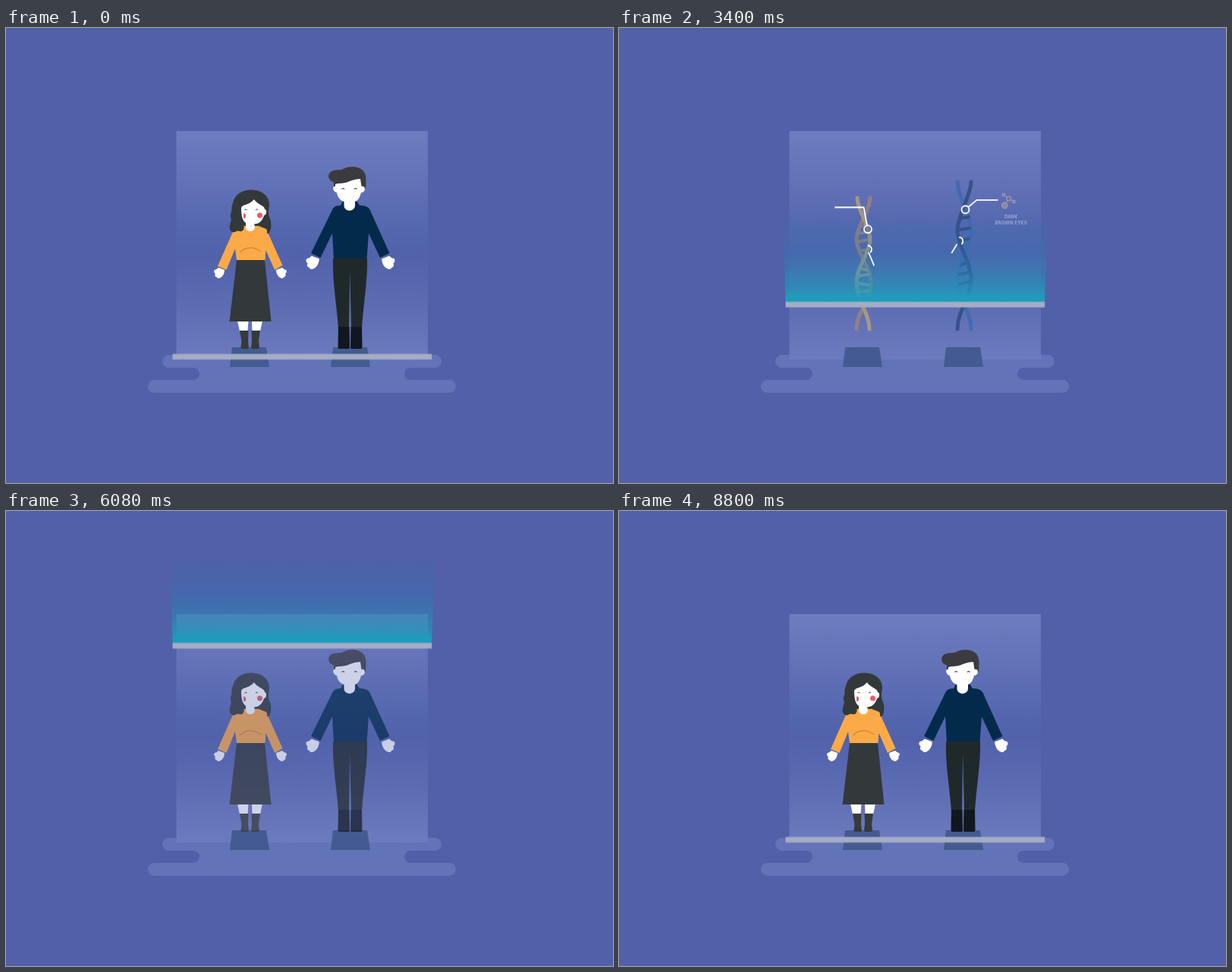
An HTML page that plays this animation: 800 by 600 pixels, repeating every 8.88 s.

```html
<!DOCTYPE html>
<html lang="en">
<head>
<meta charset="utf-8">
<title>Scanner</title>
<style>
html, body { margin: 0; width: 100%; height: 100%; overflow: hidden; background: #5160a9; }
svg { display: block; width: 100vw; height: 100vh; }

/* One pass forward, then the same pass backward. */
.scan, .trail, .people, .dna, .label, .draw path {
  animation: 4440ms linear -20ms infinite alternate both;
}
.scan { animation-name: scan; }
.trail.below { animation-name: below; }
.trail.above { animation-name: above; }
.people { animation-name: leave; }
.dna { animation-name: enter; }
.label { animation-name: label; }

.draw path { fill: none; stroke: #fff; stroke-width: 1.8; stroke-dasharray: 1 2; }
.draw .ring { fill: rgba(82, 98, 170, .45); fill-opacity: 0; }
.first .line { animation-name: line1; }
.first .ring { animation-name: ring1; fill-opacity: 1; }
.second .line { animation-name: line2; }
.second .ring { animation-name: ring2; }
.third .line { animation-name: line3; }
.third .ring { animation-name: ring3; }

@keyframes scan {
  0%, 1.351% { transform: translateY(433.5px); animation-timing-function: cubic-bezier(.333, 0, .667, 1); }
  32.883% { transform: translateY(138.7px); }
  55.405% { transform: translateY(138.7px); animation-timing-function: cubic-bezier(.333, 0, .667, 1); }
  86.937%, 100% { transform: translateY(433.5px); }
}
@keyframes below {
  0%, 1.8% { opacity: 0; }
  8.56%, 37.387% { opacity: 1; }
  48.198%, 100% { opacity: 0; }
}
@keyframes above {
  0%, 55.5% { opacity: 0; }
  62.6%, 80.63% { opacity: 1; }
  91.44%, 100% { opacity: 0; }
}
@keyframes leave { 0%, 58.1% { opacity: 1; } 72.5%, 100% { opacity: 0; } }
@keyframes enter { 0%, 68.9% { opacity: 0; } 79.28%, 100% { opacity: 1; } }
@keyframes label { 0%, 74.1% { opacity: 0; } 79.95%, 100% { opacity: 1; } }
@keyframes line1 { 0%, 71.17% { stroke-dashoffset: 1; } 77.6%, 100% { stroke-dashoffset: 0; } }
@keyframes ring1 { 0%, 71.53% { stroke-dashoffset: 1; fill-opacity: 0; } 75.59%, 100% { stroke-dashoffset: 0; fill-opacity: 1; } }
@keyframes line2 { 0%, 74.77% { stroke-dashoffset: 1; } 81.08%, 100% { stroke-dashoffset: 0; } }
@keyframes ring2 { 0%, 75.45% { stroke-dashoffset: 1; } 79.5%, 100% { stroke-dashoffset: 0; } }
@keyframes line3 { 0%, 78.47% { stroke-dashoffset: 1; } 84.77%, 100% { stroke-dashoffset: 0; } }
@keyframes ring3 { 0%, 79.14% { stroke-dashoffset: 1; } 83.2%, 100% { stroke-dashoffset: 0; } }

.strands { fill: none; stroke-width: 5; stroke-linecap: round; }
.label text {
  font: 700 6px Inter, "Open Sans", sans-serif;
  letter-spacing: .2px; text-anchor: middle; fill: #dfe2f0;
}
</style>
</head>
<body>
<svg viewBox="0 0 800 600">
  <defs>
    <linearGradient id="wall" x2="0" y2="1">
      <stop offset="0" stop-color="#6d7cbe"/>
      <stop offset=".12" stop-color="#6877bb"/>
      <stop offset=".28" stop-color="#5f6fb5"/>
      <stop offset=".42" stop-color="#5467af"/>
      <stop offset=".54" stop-color="#5162ab"/>
      <stop offset=".72" stop-color="#5a6ab1"/>
      <stop offset=".88" stop-color="#6574b8"/>
      <stop offset="1" stop-color="#6c7bbe"/>
    </linearGradient>
    <linearGradient id="teal" x2="0" y2="1">
      <stop offset="0" stop-color="#1f9dbb"/>
      <stop offset=".07" stop-color="#1f9dbb" stop-opacity=".97"/>
      <stop offset=".13" stop-color="#209bbb" stop-opacity=".76"/>
      <stop offset=".36" stop-color="#2190ba" stop-opacity=".45"/>
      <stop offset=".62" stop-color="#2a80b8" stop-opacity=".24"/>
      <stop offset=".9" stop-color="#2a80b8" stop-opacity=".09"/>
      <stop offset="1" stop-color="#2a80b8" stop-opacity="0"/>
    </linearGradient>
    <path id="hand" fill="#fff" d="M-1-6 7-3C7 1 5 6 1 7.5-1 8.5-3 8-3 6.5-6 6-6 3-5 2-8 0-7-4-4-3.5Z"/>
    <path id="block" fill="#435b90" d="M3 421H48L52 447H0Z"/>
    <path id="trail" fill="url(#teal)" d="M219.500 0H561L565 112H216Z"/>
    <path id="ring" d="M0-5A5 5 0 0 1 0 5A5 5 0 0 1 0-5" pathLength="1"/>
  </defs>

  <rect width="800" height="600" fill="#5160a9"/>
  <path fill="#6373b7" d="M214.500 431H565.500a8.500 8.500 0 0 1 0 17H533a8 8 0 0 0 0 16H584.500a8.500 8.500 0 0 1 0 17H195.500a8.500 8.500 0 0 1 0-17H247a8 8 0 0 0 0-16H214.500a8.500 8.500 0 0 1 0-17Z"/>
  <rect x="224.500" y="136" width="331.500" height="301" fill="url(#wall)"/>
  <use href="#block" x="295"/>
  <use href="#block" x="428"/>

  <g class="people">
    <g id="woman">
      <path fill="#33393a" d="M323 213.500C338 213.500 347 222 347 233 346 242 345 246 348 252 350 257 350 266 346 271L341 272 312 267C308 270 304 266 301 269 295 270 293 263 296 258 299 254 295 250 296 245 299 240 296 236 299 231 301 220 310 213.500 323 213.500Z"/>
      <use href="#hand" x="281" y="322"/>
      <use href="#hand" transform="translate(363 322) scale(-1 1)"/>
      <path fill="#fcaa47" d="M302 266 313 261H333L343 265 346 272 364.500 313 354 319 342.500 293 341.500 306H304L302 291 290.500 319 279 314 298 271Z"/>
      <path fill="#33393a" d="M297 252C295 260 293 266 299 269 303 270 304 266 308 268 312 269 315 265 313 259L306 248Z"/>
      <path fill="#33393a" d="M338 253C341 259 345 262 344 271 348 271 351 263 348 253L344 246Z"/>
      <path fill="#fff" d="M310 237C312 232 320 234 327 226 331 233 341 234 341 239 344 239 344 247 340 247 338 255 332 259 327 258.500L328 262C328 270 316 270 316 262V257C311 254 310 245 310 237Z"/>
      <circle cx="334.500" cy="247" r="3.500" fill="#ef5a5f"/>
      <path fill="#ef5a5f" d="M313 244.500A3 3 0 0 1 313 251Z"/>
      <path fill="none" stroke="#33393a" d="M314.500 240q1.500-2 3 0M329 240q1.500-2 3 0"/>
      <path fill="none" stroke="#cf8d3b" stroke-width="1.500" d="M308 296Q321 284 336 295"/>
      <path fill="#fff" d="M305 386H319.500L318.500 400H308ZM324 386H338L335 400H324.500Z"/>
      <path fill="#33393a" d="M304 306H341L349.500 387H294.500Z"/>
      <path fill="#373a3a" d="M308 399H319.500L319 413 320 421Q320 423 318 423H311Q309 423 309.500 421L310.500 413ZM323.500 399H335L333 413 334 421Q334 423 332 423H325Q323 423 323 421L324 413Z"/>
    </g>
    <g id="man">
      <path fill="#3b3b3f" d="M432 203C424 202 423 192 429 189 436 186 441 188 444 186 452 181 468 182 472 190 476 196 474 206 474 212H432Z"/>
      <use href="#hand" transform="translate(404 308) scale(1.250)"/>
      <use href="#hand" transform="translate(504 308) scale(-1.250 1.250)"/>
      <path fill="#042a4b" d="M444 228 441 234C433 234 431 237 429 242L402 297 414.500 303 430 271 432 305H475.500L478 271 493 303 505.500 297 481 243C479 236 474 234 466 234L462 228Z"/>
      <path fill="#fff" d="M434 206C438 204 445 206 453 202 458 200 463 199 467 199L468.500 209C474.500 207 474.500 217 468 217 466 225 463 228 460 229V234C460 243 445.500 243 445.500 234V229C440 227 437 223 436 217 430 216 430 207 434 209Z"/>
      <path fill="none" stroke="#33393a" stroke-width="1.200" d="M442.500 212.500q1.500-2 3.500 0M459 212.500q1.500-2 3.500 0"/>
      <path fill="#20292a" d="M431 304H476C477 330 471 365 469 396H455L453.200 318 452 396H438C436 365 430 335 431 304Z"/>
      <path fill="#11171e" d="M438 394H452.500L453 421Q453 423 451 423H439.500Q437.500 423 437.500 421ZM454.500 394H469L469.500 421Q469.500 423 467.500 423H456Q454 423 454 421Z"/>
    </g>
  </g>

  <g class="dna strands">
    <g stroke="#a08476">
      <path d="M331 224C331 240 313 262 313 279 313 296 332 315 332 336 332 358 313 376 313 397"/>
      <path stroke-width="4" d="M319 260 328 263M316 271 329 269M315 282 329 279M317 294 328 292"/>
    </g>
    <g stroke="#b9a37c">
      <path d="M314 224C314 240 331 262 331 279 331 296 313 315 313 336 313 358 330 376 330 397"/>
      <path stroke-width="4" d="M318 317 327 319M316 327 329 325M316 337 329 339M317 348 328 347"/>
    </g>
    <g stroke="#3d68ae">
      <path d="M446 203C446 220 464 248 464 267 464 286 446 310 446 330 446 354 464 374 464 397"/>
    </g>
    <g stroke="#2d4a7d">
      <path d="M464 203C464 220 446 248 446 267 446 286 464 310 464 330 464 354 446 374 446 397"/>
      <path stroke-width="4" d="M451 251 461 249M449 266 462 264M450 280 461 278M451 312 460 310M449 325 462 322M449 338 461 335"/>
    </g>
  </g>

  <g class="scan">
    <g class="trail below"><use href="#trail" y="3.500"/></g>
    <g class="trail above"><use href="#trail" transform="translate(0 -3) scale(1 -1)"/></g>
    <rect x="219.500" y="-3.700" width="341.700" height="7.400" fill="#a5acc6"/>
  </g>

  <g class="draw first">
    <path class="line" pathLength="1" d="M327 260.500 322.500 236.500H278.500"/>
    <path class="ring" pathLength="1" d="M328 260.300a5 5 0 0 1 0 10a5 5 0 0 1 0-10"/>
    <path class="line" pathLength="1" d="M460.500 236 471.500 226.800H503.500"/>
    <path class="ring" pathLength="1" d="M456.500 234.500a5 5 0 0 1 0 10a5 5 0 0 1 0-10"/>
  </g>
  <g class="draw second">
    <path class="line" pathLength="1" d="M329 296 341 325H362"/>
    <path class="ring" pathLength="1" d="M328 287a5 5 0 0 1 0 10a5 5 0 0 1 0-10"/>
    <path class="line" pathLength="1" d="M445.500 285 438 297.300H414"/>
    <path class="ring" pathLength="1" d="M448.300 276a5 5 0 0 1 0 10a5 5 0 0 1 0-10"/>
  </g>
  <g class="draw third">
    <path class="line" pathLength="1" d="M311 351 300 371H278"/>
    <path class="ring" pathLength="1" d="M316 346a5 5 0 0 1 0 10a5 5 0 0 1 0-10"/>
    <path class="line" pathLength="1" d="M464.500 351 475 371H498"/>
    <path class="ring" pathLength="1" d="M459.700 346a5 5 0 0 1 0 10a5 5 0 0 1 0-10"/>
  </g>

  <g class="label">
    <path fill="none" stroke="#c9c9d6" d="M507 220 513.500 225 520 229M513.500 225 508.500 234"/>
    <g stroke="#c9c9d6" stroke-width="1.200">
      <circle cx="508.300" cy="234" r="3.800" fill="#c2a678"/>
      <circle cx="513.700" cy="225" r="3" fill="#b9685c"/>
      <circle cx="507" cy="220" r="1.800" fill="#8089b8"/>
      <circle cx="520.300" cy="229" r="1.800" fill="#8089b8"/>
    </g>
    <text x="516.700" y="251.300">DARK</text>
    <text x="516.700" y="259.200">BROWN EYES</text>
  </g>
</svg>
</body>
</html>
```
